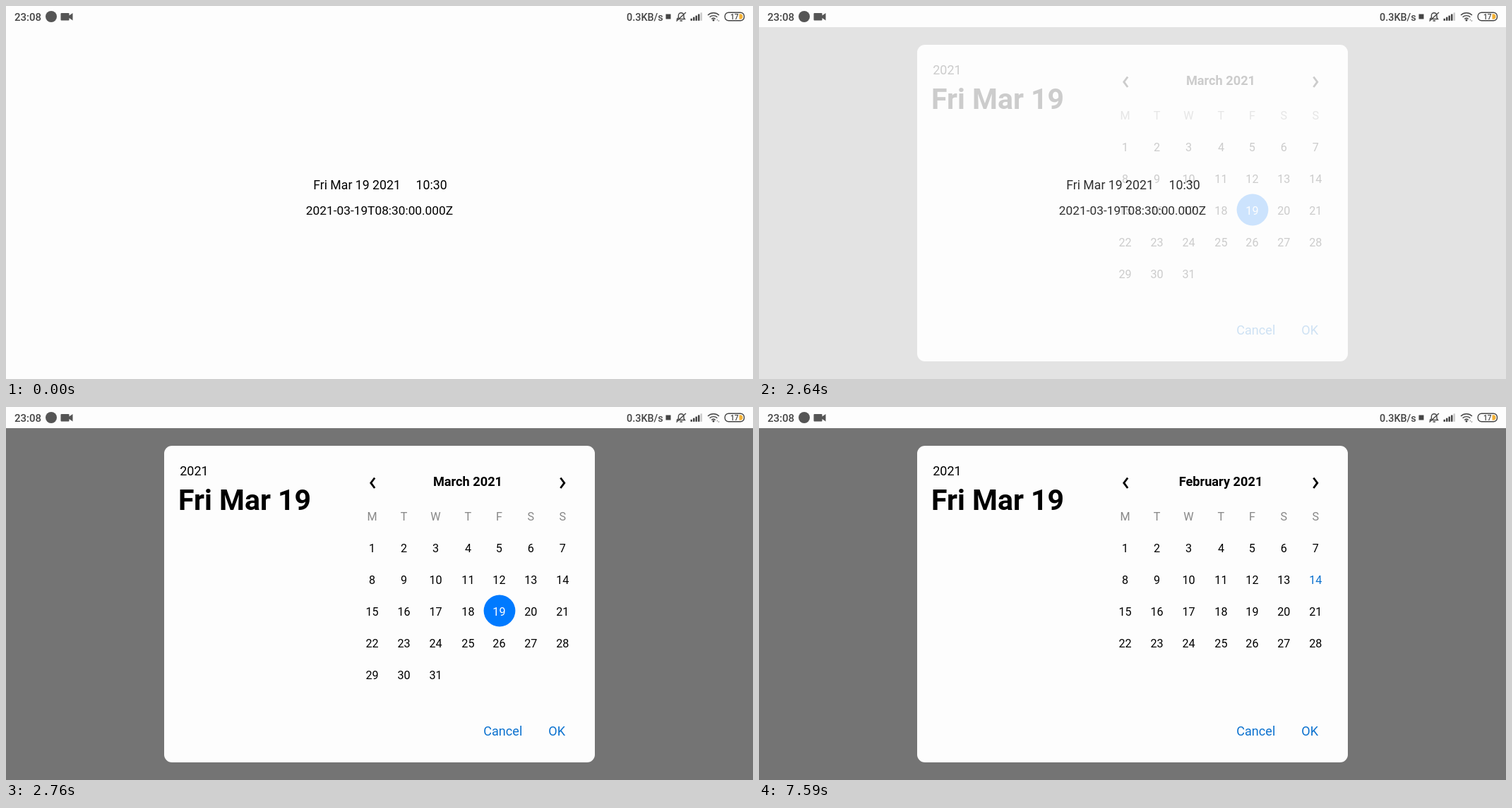
Recreate the animation shown at these times as an HTML page. Size 1058 by 529 pixels, loop 8000 ms.

```html
<!DOCTYPE html>
<html lang="en">
<head>
<meta charset="utf-8">
<title>Date picker</title>
<style>
html, body { margin: 0; width: 100%; height: 100%; overflow: hidden; background: #fdfdfd; }
svg { display: block; width: 100vw; height: 100vh; font-family: Roboto, sans-serif; }
text { white-space: pre; }
.mid { text-anchor: middle; }
.bold { font-weight: 700; }
.status { fill: #444; font-weight: 500; }
.line { fill: none; stroke: #444; stroke-width: 1.4; }
.arrow { fill: none; stroke: #000; stroke-width: 2.8; }
.button { fill: #0c72cf; }
</style>
</head>
<body>
<svg viewBox="0 0 1058 529">
  <rect width="1058" height="529" fill="#fdfdfd"/>
  <g font-size="17.7" class="mid">
    <text x="497" y="259.5">Fri Mar 19 2021</text>
    <text x="602.6" y="259.5">10:30</text>
    <text x="529" y="296" font-size="17.3">2021-03-19T08:30:00.000Z</text>
  </g>

  <g id="modal">
    <rect y="30" width="1058" height="499" fill="#000" fill-opacity=".54"/>
    <rect x="224" y="55" width="610" height="449" rx="11" fill="#fdfdfd"/>
    <text x="246.2" y="97.3" font-size="18">2021</text>
    <text x="244" y="146" font-size="41" class="bold">Fri Mar 19</text>
    <path class="arrow" d="M522.2 100.5L516.8 107.7L522.2 115M785.4 100.5L790.8 107.7L785.4 115"/>
    <text id="title" x="654" y="112" font-size="18.2" class="bold mid"></text>
    <g id="days" class="mid" font-size="16.2"></g>
    <g class="button mid" font-size="18.1">
      <text x="703.8" y="466.3">Cancel</text>
      <text x="780.2" y="466.3">OK</text>
    </g>
  </g>

  <g class="status">
    <text x="12" y="20.6" font-size="15">23:08</text>
    <circle cx="64" cy="15" r="8" fill="#555"/>
    <path fill="#555" d="M78.5 10H88.5Q89.5 10 89.5 11V13.5L94.5 10V20.5L89.5 17V19.5Q89.5 20.5 88.5 20.5H78.5Q77.5 20.5 77.5 19.5V11Q77.5 10 78.5 10Z"/>
    <text id="speed" x="879" y="20.6" font-size="14.4"></text>
    <rect x="934.5" y="11.5" width="7" height="7"/>
    <path class="line" d="M950.5 18.5H961.5L960 16.5V13.5A3.8 3.8 0 0 0 952.4 13.5V16.5ZM954.5 21H958M949.5 21.5L963 9"/>
    <g id="bars"></g>
    <path class="line" stroke-width="2" d="M994 13A11.6 11.6 0 0 1 1010 13M996.6 15.8A7.8 7.8 0 0 1 1007.4 15.8M999.3 18.4A4 4 0 0 1 1004.7 18.4"/>
    <circle cx="1002" cy="20" r="1.5"/>
    <path id="traffic" d="M1006.3 20.2L1007.5 18.4L1008.7 20.2ZM1008.3 20.4L1009.5 22.2L1010.7 20.4Z"/>
    <rect class="line" x="1018.2" y="9.2" width="27.3" height="11.6" rx="5.2"/>
    <path fill="#f2b035" d="M1038.5 11.2H1040A3.5 3.8 0 0 1 1040 18.8H1038.5Z"/>
    <text x="1026" y="18.7" font-size="10.2">17</text>
  </g>
</svg>
<script>
const LOOP = 8000;
const $ = id => document.getElementById(id);

const march = { title: 'March 2021', first: 0, count: 31, selected: 19 };
const april = { title: 'April 2021', first: 3, count: 30 };
const february = { title: 'February 2021', first: 0, count: 28, today: 14 };

// Each track is a list of [start time, value] and holds between entries.
const tracks = {
  fade: [[0, 0], [2560, .03], [2600, .09], [2640, .19], [2680, .34], [2720, .65], [2760, 1]],
  month: [[0, march], [4210, april], [5360, march], [6270, february]],
  speed: [[0, '0.3'], [3550, '0.4'], [4210, '0.2'], [7590, '0.3']],
  traffic: [[0, .6], [6270, 1], [7260, .6]]
};
const at = (track, t) => track.findLast(([start]) => start <= t)[1];

const colX = i => 518.6 + 44.95 * i + (i === 3 ? 1 : 0);
const label = (x, y, s, fill) => `<text x="${x}" y="${y + 5.8}" fill="${fill}">${s}</text>`;

function drawMonth({ title, first, count, selected, today }) {
  $('title').textContent = title;
  let out = [...'MTWTFSS'].map((d, i) => label(colX(i), 155, d, '#888')).join('');
  for (let day = 1; day <= count; day++) {
    const cell = first + day - 1;
    const x = colX(cell % 7), y = 200 + 45 * Math.floor(cell / 7);
    if (day === selected) out += `<circle cx="${x + .6}" cy="${y - 1}" r="22.4" fill="#007aff"/>`;
    out += label(x, y, day, day === selected ? '#fff' : day === today ? '#0c72cf' : '#000');
  }
  $('days').innerHTML = out;
}

$('bars').innerHTML = [0, 1, 2, 3, 4].map(i => {
  const h = 3 + 2.1 * i;
  return `<rect x="${969.5 + 3.5 * i}" y="${20.8 - h}" width="2.5" height="${h}" fill="${i < 4 ? '#444' : '#ccc'}"/>`;
}).join('');

let shown;
function frame(now) {
  const t = now % LOOP;
  const month = at(tracks.month, t);
  if (month !== shown) drawMonth(shown = month);
  $('modal').setAttribute('opacity', at(tracks.fade, t));
  $('speed').textContent = at(tracks.speed, t) + 'KB/s';
  $('traffic').setAttribute('opacity', at(tracks.traffic, t));
  requestAnimationFrame(frame);
}
frame(0);
</script>
</body>
</html>
```
